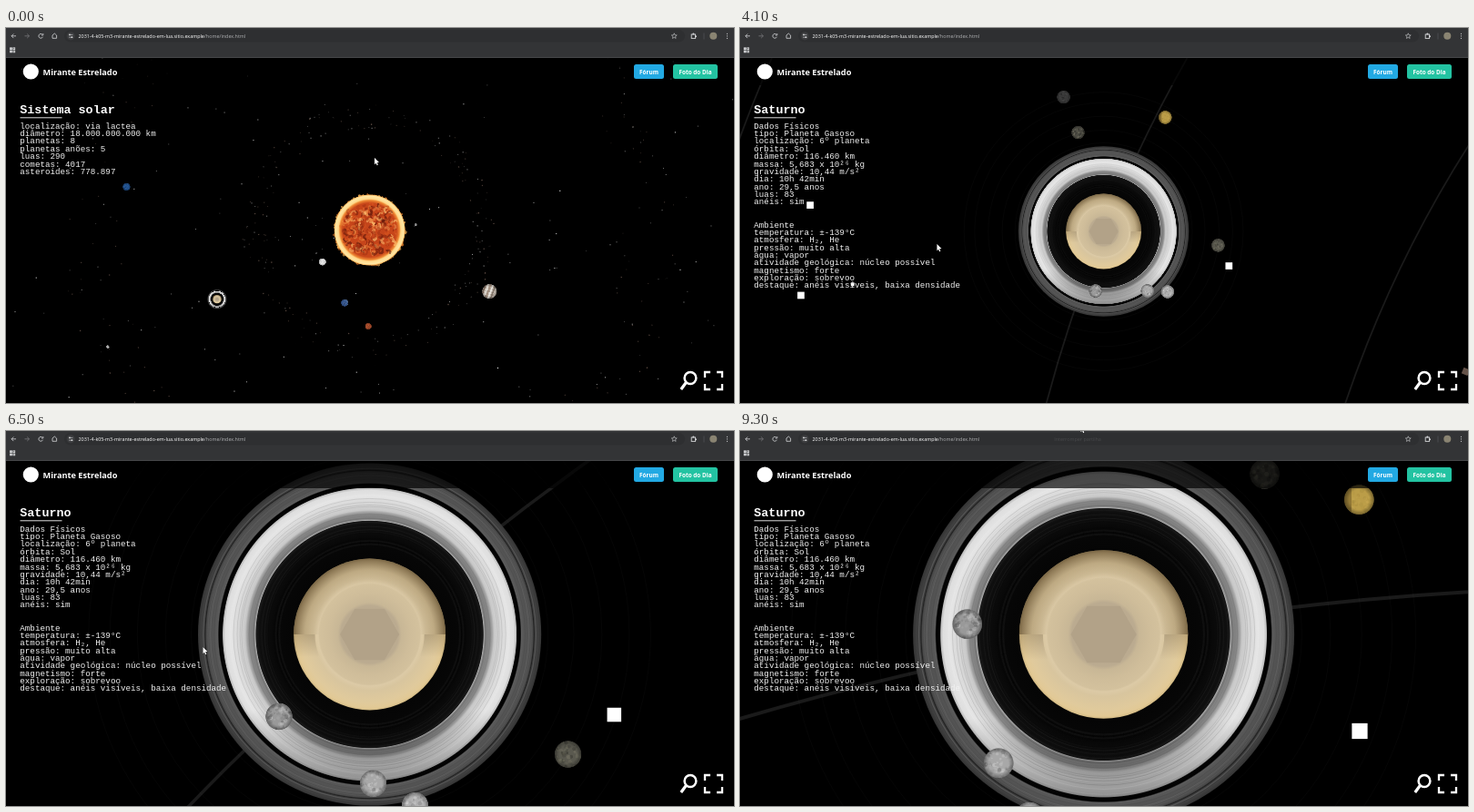
An HTML page with a canvas that plays this animation: 800x413 px, repeating every 9400 ms.

```html
<!DOCTYPE html>
<html lang="pt-BR">
<head>
<meta charset="utf-8">
<title>Sistema solar</title>
<style>
html, body { margin: 0; width: 100%; height: 100%; overflow: hidden; background: #000; }
canvas { display: block; width: 800px; height: 413px; }
</style>
</head>
<body>
<canvas id="stage" width="800" height="413"></canvas>
<script>
const ctx = document.getElementById('stage').getContext('2d');
const TAU = Math.PI * 2, DEG = Math.PI / 180;
const LOOP = 9400, STEP = 100, ZOOM_START = 2000, FOCUS_AT = 2050;
const CX = 399.6, CY = 224, SATURN_R = 4.7;
const MONO = '"Liberation Mono", "Courier New", monospace';
const SANS = '"Open Sans", "Noto Sans", sans-serif';

function seeded(seed) {
  return () => {
    seed = (seed + 0x6D2B79F5) | 0;
    let v = Math.imul(seed ^ (seed >>> 15), 1 | seed);
    v = (v + Math.imul(v ^ (v >>> 7), 61 | v)) ^ v;
    return ((v ^ (v >>> 14)) >>> 0) / 4294967296;
  };
}
const clamp = (v, a = 0, b = 1) => Math.min(b, Math.max(a, v));
const mix = (a, b, k) => a + (b - a) * k;

function disc(c, x, y, r, fill) {
  c.fillStyle = fill;
  c.beginPath();
  c.arc(x, y, r, 0, TAU);
  c.fill();
}
function circle(x, y, r, color, width) {
  ctx.strokeStyle = color;
  ctx.lineWidth = width;
  ctx.beginPath();
  ctx.arc(x, y, r, 0, TAU);
  ctx.stroke();
}
function line(points, color, width, close) {
  ctx.strokeStyle = color;
  ctx.lineWidth = width;
  ctx.beginPath();
  points.forEach(([x, y]) => ctx.lineTo(x, y));
  if (close) ctx.closePath();
  ctx.stroke();
}
function pill(x, y, w, h, r, fill) {
  ctx.fillStyle = fill;
  ctx.beginPath();
  ctx.roundRect(x, y, w, h, r);
  ctx.fill();
}
function text(s, x, y, font, fill = '#fff', align = 'left') {
  ctx.font = font;
  ctx.fillStyle = fill;
  ctx.textAlign = align;
  ctx.fillText(s, x, y);
}
function square(x, y, size, angle = 0) {
  ctx.save();
  ctx.translate(x, y);
  ctx.rotate(angle);
  ctx.fillRect(-size / 2, -size / 2, size, size);
  ctx.restore();
}
function sprite(size, paint) {
  const c = document.createElement('canvas');
  c.width = c.height = size;
  const g = c.getContext('2d');
  g.translate(size / 2, size / 2);
  paint(g, size / 2);
  return c;
}
function drawSprite(img, x, y, r, angle = 0) {
  ctx.save();
  ctx.translate(x, y);
  ctx.rotate(angle);
  ctx.drawImage(img, -r, -r, 2 * r, 2 * r);
  ctx.restore();
}

// A mottled ball; "detail" paints extra marks before the edge shading.
function ball(color, seed, light, dark, detail) {
  return sprite(64, (g, R) => {
    const rnd = seeded(seed);
    g.beginPath();
    g.arc(0, 0, R - 1, 0, TAU);
    g.clip();
    g.fillStyle = color;
    g.fillRect(-R, -R, 2 * R, 2 * R);
    for (let i = 0; i < 90; i++) {
      g.globalAlpha = 0.1 + rnd() * 0.3;
      disc(g, (rnd() * 2 - 1) * R, (rnd() * 2 - 1) * R, 1 + rnd() * 4, rnd() < 0.5 ? light : dark);
    }
    g.globalAlpha = 1;
    if (detail) detail(g, R);
    const edge = g.createRadialGradient(0, 0, R * 0.65, 0, 0, R);
    edge.addColorStop(0, 'rgba(0,0,0,0)');
    edge.addColorStop(1, 'rgba(0,0,0,.4)');
    disc(g, 0, 0, R, edge);
  });
}
function stripes(g, R) {
  ['#8a7668', '#ded8d0', '#a08c7c', '#e6e2dc', '#83776c', '#c9c0b6'].forEach((c, i) => {
    g.fillStyle = c;
    g.fillRect(-R + 4 + i * 10, -R, 6, 2 * R);
  });
}
function shadowBand(g, R) {
  g.fillStyle = 'rgba(70,52,20,.35)';
  g.fillRect(-R, -R, R * 0.5, 2 * R);
}

const sun = sprite(252, (g) => {
  const rnd = seeded(11);
  g.scale(3, 3);
  for (let i = 0; i < 150; i++) {
    const a = rnd() * TAU, r = 36.5 + rnd() * 3.2;
    g.globalAlpha = 0.6;
    disc(g, Math.cos(a) * r, Math.sin(a) * r, 0.6 + rnd() * 1.2, rnd() < 0.5 ? '#e07a2a' : '#ffb95c');
  }
  g.globalAlpha = 1;
  const body = g.createRadialGradient(0, 0, 0, 0, 0, 39);
  [[0, '#c4451c'], [0.76, '#c8461a'], [0.84, '#f08a35'], [0.88, '#ffd98a'], [0.96, '#ffe7a6'], [1, '#f4a546']]
    .forEach(([k, c]) => body.addColorStop(k, c));
  disc(g, 0, 0, 39, body);
  const tones = ['#4d0e07', '#7d1f0d', '#a83413', '#d9561f', '#f08a40', '#ffc070'];
  g.lineCap = 'round';
  for (let i = 0; i < 260; i++) {
    const a = rnd() * TAU, r = Math.sqrt(rnd()) * 30, turn = rnd() * TAU, len = 1.5 + rnd() * 4;
    const x = Math.cos(a) * r, y = Math.sin(a) * r;
    g.globalAlpha = 0.25 + rnd() * 0.4;
    g.strokeStyle = tones[Math.floor(rnd() * tones.length)];
    g.lineWidth = 0.8 + rnd() * 2.2;
    g.beginPath();
    g.moveTo(x, y);
    g.quadraticCurveTo(x + Math.cos(turn) * len, y + Math.sin(turn) * len,
      x + Math.cos(turn + 0.8) * len, y + Math.sin(turn + 0.8) * len);
    g.stroke();
  }
});

// Angles in degrees, speeds in degrees per second.
const planet = (orbit, start, speed, r, img) => ({ orbit, start, speed, r, img });
const mars = planet(105.5, 90.8, 27, 3.7, ball('#a94c2c', 4, '#d8774a', '#5b2414'));
const saturn = planet(183.5, 156, 11.2, SATURN_R);
const planets = [
  planet(51, -7.3, 52.9, 1.7, ball('#858585', 1, '#bbb', '#444')),
  planet(62.3, 146.3, 39.4, 4.1, ball('#dcdcdc', 2, '#fff', '#aaa')),
  planet(84.2, 109, 33.3, 4.2, ball('#35568e', 3, '#b5c4cc', '#16284c')),
  mars,
  planet(147.8, 27, 14.7, 8.3, ball('#b8aca0', 5, '#e8e4de', '#7c6c60', stripes)),
  planet(271.5, 190.2, 6.1, 4.3, ball('#21508c', 6, '#3f78b4', '#102a55')),
  planet(315, 156, 3.6, 1.8, ball('#b0b0b0', 7, '#eee', '#555'))
];
const jupiter = planets[4];
const ORBITS = [147.8, 183.5, 230, 271.5];

function place(p, sec) {
  const a = (p.start + p.speed * sec) * DEG;
  return { x: Math.cos(a) * p.orbit, y: Math.sin(a) * p.orbit };
}

// Orbit radius in planet radii, angle at 2.9 s, speed.
const moon = (orbit, angle, speed, img) => ({ orbit, angle, speed, img });
const moons = [
  moon(1.62, 77.7, 16.6, ball('#999', 21, '#d2d2d2', '#505050')),
  moon(1.98, 36.8, 14.4, ball('#a8a8a8', 22, '#dcdcdc', '#707070')),
  moon(2.35, 28.1, 13.1, ball('#b0b0b0', 23, '#e2e2e2', '#7a7a7a')),
  moon(2.69, 241.6, 11.5, ball('#4b4a42', 24, '#85826e', '#1c1c18')),
  moon(3.06, -4.6, 10, ball('#5a594f', 25, '#86846f', '#2c2c26')),
  moon(3.42, -69.3, 6.5, ball('#bb9d48', 26, '#c8aa54', '#a58a3c', shadowBand)),
  moon(3.7, -111, 3.6, ball('#383838', 27, '#555', '#1c1c1c'))
];

const rand = seeded(77);
const NEAR = 4.35, PARALLAX = 0.0097;
const nearHome = place(saturn, 2.9);
const nearStars = [
  [353, 126, 4], [491, 81, 2], [694, 118, 4], [738, 111, 4], [241, 208, 4], [236, 257, 4],
  [152, 330, 4], [51, 390, 4], [468, 241, 4], [182, 161, 2], [151, 198, 2], [264, 251, 2],
  [180, 311, 2], [156, 327, 2], [132, 362, 2], [622, 201, 2], [551, 377, 2], [744, 356, 2],
  [580, 46, 2], [70, 87, 4], [110, 160, 4], [29, 249, 3], [86, 264, 3]
].map(([x, y, size]) => ({
  x: (x - CX) / NEAR + nearHome.x * PARALLAX,
  y: (y - CY) / NEAR + nearHome.y * PARALLAX,
  size: size / NEAR * 0.95, alpha: 1
}));
const farStars = Array.from({ length: 210 }, () => ({
  x: (rand() - 0.5) * 860, y: (rand() - 0.5) * 560, size: 0.6 + rand() * 0.5, alpha: 0.35 + rand() * 0.6
})).filter(p => Math.abs(p.x) > 97 || Math.abs(p.y) > 48);
const stars = nearStars.concat(farStars);

const rock = (inner, spread) => ({
  orbit: inner + rand() * spread, angle: rand() * TAU, size: 0.5 + rand() * 0.8,
  alpha: 0.35 + rand() * 0.4, color: rand() < 0.6 ? '#8e7466' : '#a8a8a8'
});
const rocks = [
  ...Array.from({ length: 190 }, () => rock(113, 27)),
  ...Array.from({ length: 230 }, () => rock(275, 65))
];

const ringStops = [
  [1, '#050505'], [1.25, '#070707'], [1.45, '#0f0f0f'], [1.495, '#161616'], [1.505, '#b0b0b0'], [1.525, '#747474'],
  [1.6, '#8f8f8f'], [1.64, '#c8c8c8'], [1.74, '#d6d6d6'], [1.82, '#e5e5e5'], [1.9, '#dedede'], [1.93, '#b8b8b8'],
  [1.94, '#040404'], [1.985, '#040404'], [2, '#5a5a5a'], [2.15, '#4a4a4a'], [2.165, '#202020'], [2.185, '#474747'],
  [2.26, '#343434']
];
const discStops = [
  [0, '#b8a88e'], [0.38, '#bbab90'], [0.42, '#c8b796'], [0.54, '#cfbd9a'], [0.66, '#d3c19d'], [0.68, '#dccaa6'],
  [0.74, '#d8c59e'], [0.9, '#e0ca9c'], [0.97, '#e2c995'], [1, '#d2b983']
];
const grooves = Array.from({ length: 46 }, () => ({
  r: 1.15 + rand() * 1.08, shade: rand() < 0.5 ? '255,255,255' : '0,0,0', alpha: 0.03 + rand() * 0.12
}));
grooves.filter(g => g.r < 1.5).forEach(g => { g.alpha *= 0.4; });

function radial(x, y, r, stops, max) {
  const g = ctx.createRadialGradient(x, y, 0, x, y, r * max);
  stops.forEach(([k, c]) => g.addColorStop(k / max, c));
  return g;
}
function drawSaturn(x, y, R) {
  disc(ctx, x, y, R * 2.26, radial(x, y, R, ringStops, 2.26));
  const dusk = ctx.createLinearGradient(0, y + R, 0, y + 2 * R);
  dusk.addColorStop(0, 'rgba(0,0,0,0)');
  dusk.addColorStop(1, 'rgba(0,0,0,.38)');
  disc(ctx, x, y, R * 1.94, dusk);
  if (R > 10) {
    grooves.forEach(g => circle(x, y, g.r * R, `rgba(${g.shade},${g.alpha})`, R * 0.009));
  }
  disc(ctx, x, y, R, radial(x, y, R, discStops, 1));

  // The upper half darkens towards its rim; the seam fades away below.
  ctx.fillStyle = radial(x, y, R, [[0.66, 'rgba(62,46,26,0)'], [0.85, 'rgba(62,46,26,.2)'], [1, 'rgba(62,46,26,.6)']], 1);
  ctx.beginPath();
  ctx.arc(x, y, R, Math.PI, TAU);
  ctx.fill();
  const seam = ctx.createLinearGradient(0, y, 0, y + R * 0.3);
  seam.addColorStop(0, 'rgba(62,46,26,.22)');
  seam.addColorStop(1, 'rgba(62,46,26,0)');
  ctx.fillStyle = seam;
  ctx.beginPath();
  ctx.arc(x, y, R, 0, Math.PI);
  ctx.arc(x, y, R * 0.72, Math.PI, 0, true);
  ctx.fill();

  ctx.fillStyle = '#b2a288';
  ctx.beginPath();
  for (let i = 0; i < 6; i++) {
    ctx.lineTo(x + Math.cos(i * TAU / 6) * R * 0.39, y + Math.sin(i * TAU / 6) * R * 0.39);
  }
  ctx.fill();
}

function drawSpace(t) {
  const sec = t / 1000;
  const zoom = clamp(1 + (t - ZOOM_START) / 1000 * 17.5 / SATURN_R, 1, 92.7 / SATURN_R);
  const home = place(saturn, sec);
  const follow = 1 - (1 - clamp((t - ZOOM_START) / 300)) ** 3;
  const cam = { x: home.x * follow, y: home.y * follow };
  const sx = (x, pull = 1) => CX + (x - cam.x * pull) * zoom;
  const sy = (y, pull = 1) => CY + (y - cam.y * pull) * zoom;

  ctx.fillStyle = '#fff';
  stars.forEach(p => {
    ctx.globalAlpha = p.alpha;
    square(sx(p.x, PARALLAX), sy(p.y, PARALLAX), p.size * zoom);
  });
  rocks.forEach(p => {
    const a = p.angle + 2 * sec * DEG;
    ctx.globalAlpha = p.alpha;
    ctx.fillStyle = p.color;
    square(sx(Math.cos(a) * p.orbit), sy(Math.sin(a) * p.orbit), p.size * zoom, a);
  });
  ctx.globalAlpha = 1;

  ORBITS.forEach(r => circle(sx(0), sy(0), r * zoom, `rgba(255,255,255,${zoom > 1 ? 0.1 : 0.03})`, 0.2 * zoom));
  drawSprite(sun, sx(0), sy(-1.5), 42 * zoom);
  planets.forEach(p => {
    const { x, y } = place(p, sec);
    drawSprite(p.img, sx(x), sy(y - 1), p.r * zoom, p === jupiter ? (20 - 10 * sec) * DEG : 0);
  });

  const R = SATURN_R * zoom, x = sx(home.x), y = sy(home.y);
  if (zoom > 1) {
    const m = place(mars, sec);
    drawSprite(planets[6].img, sx(m.x + 8), sy(m.y - 2), 0.7 * zoom);
    moons.forEach(o => circle(x, y, o.orbit * R, 'rgba(255,255,255,.025)', 1));
  }
  drawSaturn(x, y, R);
  if (zoom > 1) {
    moons.forEach(o => {
      const a = (o.angle + o.speed * (sec - 2.9)) * DEG;
      drawSprite(o.img, x + Math.cos(a) * o.orbit * R, y - 1 + Math.sin(a) * o.orbit * R, 0.182 * R);
    });
  }
}

const systemInfo = ['Sistema solar', 'localização: via lactea', 'diâmetro: 18.000.000.000 km', 'planetas: 8',
  'planetas anões: 5', 'luas: 290', 'cometas: 4017', 'asteroides: 778.897'];
const saturnInfo = ['Saturno', 'Dados Físicos', 'tipo: Planeta Gasoso', 'localização: 6º planeta', 'órbita: Sol',
  'diâmetro: 116.460 km', 'massa: 5,683 x 10²⁶ kg', 'gravidade: 10,44 m/s²', 'dia: 10h 42min', 'ano: 29,5 anos',
  'luas: 83', 'anéis: sim', '', '', 'Ambiente', 'temperatura: ±-139°C', 'atmosfera: H₂, He', 'pressão: muito alta',
  'água: vapor', 'atividade geológica: núcleo possível', 'magnetismo: forte', 'exploração: sobrevoo',
  'destaque: anéis visíveis, baixa densidade'];

function drawPage(t) {
  ctx.fillStyle = 'rgba(0,0,0,.68)';
  ctx.fillRect(0, 33, 800, 30);
  disc(ctx, 27.3, 48, 8.6, '#fff');
  text('Mirante Estrelado', 40.5, 51.8, `bold 9.2px ${SANS}`);
  pill(690, 40, 33, 16, 2.5, '#22a9e3');
  text('Fórum', 706.5, 50.5, `bold 6.4px ${SANS}`, '#fff', 'center');
  pill(733, 40, 49, 16, 2.5, '#23c3a2');
  text('Foto do Dia', 757.5, 50.5, `bold 6.4px ${SANS}`, '#fff', 'center');

  const [title, ...rows] = t < FOCUS_AT ? systemInfo : saturnInfo;
  text(title, 15.3, 93.8, `bold 13.4px ${MONO}`);
  ctx.fillStyle = '#ddd';
  ctx.fillRect(15.5, 98.3, 46, 1);
  rows.forEach((row, i) => text(row, 15.3, 110.7 + i * 8.37, `9.23px ${MONO}`, '#f2f2f2'));

  circle(752, 385.5, 6.4, '#fff', 2.5);
  line([[747.3, 390.5], [741.8, 398]], '#fff', 3.2);
  [[768, 379, 1, 1], [787, 379, -1, 1], [768, 398, 1, -1], [787, 398, -1, -1]].forEach(([x, y, dx, dy]) =>
    line([[x + 6 * dx, y], [x, y], [x, y + 6 * dy]], '#fff', 2.3));
}

function drawBrowser(t) {
  const ink = '#d4d5d7', faint = '#77787a';
  ctx.fillStyle = '#333436';
  ctx.fillRect(0, 0, 800, 33);
  pill(64, 2, 682, 13.5, 6.7, '#2e2f31');
  ctx.fillStyle = '#454648';
  ctx.fillRect(0, 32, 800, 1);

  [[11, 6, -1, ink], [20.5, 25.5, 1, faint]].forEach(([tail, tip, dir, color]) => {
    line([[tail, 8.8], [tip, 8.8]], color, 0.8);
    line([[tip - 2.3 * dir, 6.5], [tip, 8.8], [tip - 2.3 * dir, 11.1]], color, 0.8);
  });
  ctx.strokeStyle = ink;
  ctx.lineWidth = 0.8;
  ctx.beginPath();
  ctx.arc(38.3, 8.8, 2.4, 0.4, 5.4);
  ctx.stroke();
  line([[40.8, 6], [40.8, 8], [38.8, 8]], ink, 0.8);
  line([[51, 11.3], [51, 8], [53.3, 6], [55.6, 8], [55.6, 11.3]], ink, 0.8, true);
  disc(ctx, 71.2, 8.8, 4.6, '#3b3c3e');
  [7.4, 10.2].forEach((y, i) => {
    line([[69, y], [73.4, y]], ink, 0.6);
    disc(ctx, i ? 72.4 : 70, y, 0.9, ink);
  });

  const font = `5.4px ${SANS}`;
  const host = '2031-4-k05-m3-mirante-estrelado-em-lua.sitio.example';
  text(host, 79.5, 10.8, font, '#fff');
  text('/home/index.html', 79.5 + ctx.measureText(host).width, 10.8, font, '#b0b1b3');

  const starPoints = Array.from({ length: 10 }, (_, i) => {
    const a = i * TAU / 10 - TAU / 4, r = i % 2 ? 1.4 : 3.1;
    return [734.3 + Math.cos(a) * r, 8.9 + Math.sin(a) * r];
  });
  line(starPoints, ink, 0.6, true);
  ctx.lineWidth = 0.9;
  ctx.strokeRect(753.2, 7, 4.4, 4.4);
  [4.6, 7.9].forEach(x => [21.8, 25].forEach(y => ctx.strokeRect(x, y, 1.8, 1.8)));
  disc(ctx, 755.4, 6.6, 1, ink);
  disc(ctx, 758, 9.2, 1, ink);
  line([[767, 5.5], [767, 12.5]], '#55565a', 0.7);
  disc(ctx, 777.3, 8.8, 4, '#8a8472');
  [6.3, 8.8, 11.3].forEach(y => disc(ctx, 792.5, y, 0.6, ink));

  if (t >= 9100) text('Interromper partilha', 371, 10.6, font, '#48494b', 'center');
}

const cursorPath = [[0, 405, 143], [400, 405, 143], [1400, 224, 241], [1700, 224, 241], [2000, 216.5, 238],
  [6900, 216.5, 238], [7300, 374.5, -6]];
function drawCursor(t) {
  let i = cursorPath.findIndex(p => p[0] > t);
  if (i < 0) i = cursorPath.length - 1;
  const [t0, x0, y0] = cursorPath[i - 1], [t1, x1, y1] = cursorPath[i];
  const k = clamp((t - t0) / (t1 - t0)), e = k * k * (3 - 2 * k);
  ctx.save();
  ctx.translate(mix(x0, x1, e), mix(y0, y1, e));
  const arrow = [[0, 0], [0, 7.2], [1.6, 5.8], [2.7, 8.2], [3.8, 7.7], [2.7, 5.3], [4.9, 5.1]];
  line(arrow, '#222', 0.8, true);
  ctx.fillStyle = '#fff';
  ctx.fill();
  ctx.restore();
}

function frame(now) {
  const t = Math.floor((now % LOOP) / STEP) * STEP;
  ctx.fillStyle = '#000';
  ctx.fillRect(0, 0, 800, 413);
  drawSpace(t);
  drawPage(t);
  drawBrowser(t);
  drawCursor(t);
  requestAnimationFrame(frame);
}
requestAnimationFrame(frame);
</script>
</body>
</html>
```
